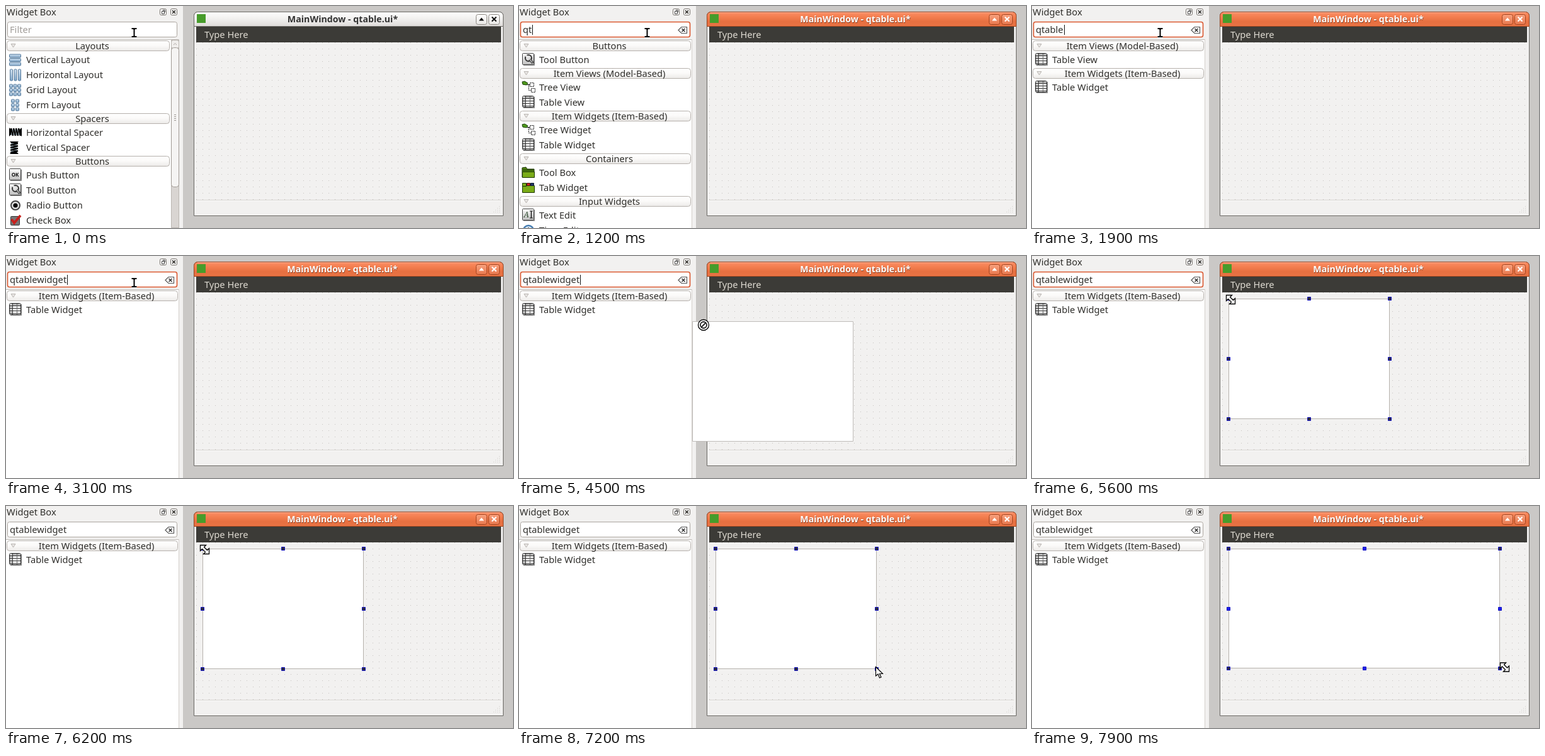
Animation of 805x354 px, one loop 8000 ms. Source, as an HTML page with a canvas:

```html
<!DOCTYPE html>
<html lang="en">
<head>
<meta charset="utf-8">
<title>Dragging a table widget into a form</title>
<style>
html, body { margin: 0; width: 100%; height: 100%; overflow: hidden; background: #cac8c6; }
canvas { display: block; }
</style>
</head>
<body>
<canvas id="stage" width="805" height="354"></canvas>
<script>
const c = document.getElementById('stage').getContext('2d');
const LOOP = 8000;
const FONT = '14.67px "Noto Sans", sans-serif';
const BOLD = 'bold 14.2px "Noto Sans", sans-serif';
const INK = '#2f2e2b', PANEL = '#f2f1f0', EDGE = '#b6b1ac';

// Drawing helpers
const mix = (a, b, k) => a + (b - a) * k;
const clamp = k => Math.max(0, Math.min(1, k));
const span = (t, a, b) => clamp((t - a) / (b - a));
const lerp = (p, q, k) => [mix(p[0], q[0], k), mix(p[1], q[1], k)];

function rect(x, y, w, h, fill) {
  c.fillStyle = fill;
  c.fillRect(x, y, w, h);
}
function box(x, y, w, h, fill, stroke, r = 0, lw = 1) {
  c.beginPath();
  c.roundRect(x + .5, y + .5, w - 1, h - 1, r);
  paint(fill, stroke, lw);
}
function paint(fill, stroke, lw = 1) {
  if (fill) { c.fillStyle = fill; c.fill(); }
  if (stroke) { c.strokeStyle = stroke; c.lineWidth = lw; c.stroke(); }
}
function poly(pts, fill, stroke, lw = 1, open) {
  c.beginPath();
  for (let i = 0; i < pts.length; i += 2) c.lineTo(pts[i], pts[i + 1]);
  if (!open) c.closePath();
  paint(fill, stroke, lw);
}
const line = (pts, stroke, lw) => poly(pts, null, stroke, lw, true);
function disc(x, y, r, fill, stroke, lw) {
  c.beginPath();
  c.arc(x, y, r, 0, 7);
  paint(fill, stroke, lw);
}
function text(s, x, y, fill = INK, font = FONT, align = 'left') {
  c.font = font;
  c.textAlign = align;
  c.fillStyle = fill;
  c.fillText(s, x, y);
}
function shade(y, h, ...stops) {
  const g = c.createLinearGradient(0, y, 0, y + h);
  stops.forEach((s, i) => g.addColorStop(i / (stops.length - 1), s));
  return g;
}
function at(x, y, draw) {
  c.save();
  c.translate(x, y);
  draw();
  c.restore();
}

// Widget icons, each in a 20 x 20 box
const tile = (x, y, w, h) => box(x, y, w, h, shade(y, h, '#d4e4f2', '#7fa6c9'), '#54799b', 1);
function tiles(x, cols, rows, w, h, dx, dy) {
  for (let i = 0; i < cols * rows; i++) tile(x + i % cols * dx, 1.5 + Math.floor(i / cols) * dy, w, h);
}
function button() {
  rect(2, 2, 18, 18, '#555555aa');
  box(0, 0, 19, 19, shade(0, 19, '#fff', '#bcbcbc'), '#444', 1);
}
function spring() {
  rect(2, 6, 16, 9, '#9fb4c2');
  for (let x = 3; x < 17; x += 4) {
    line([x, 4, x + 3, 16], '#000', 2.6);
    line([x + 3, 16, x + 4, 4], '#333', 1.2);
  }
  poly([0, 3, 3, 6, 3, 14, 0, 17], '#000');
  poly([20, 3, 17, 6, 17, 14, 20, 17], '#000');
}
function tree() {
  poly([0, 2, 4, 1, 9, 4, 7, 7, 1, 6], '#4f9a1c', '#173d08');
  c.setLineDash([2, 1]);
  line([8, 6.5, 13, 6.5], '#111');
  line([10.5, 6, 10.5, 15.5, 15, 15.5], '#111');
  box(12, 3, 7, 7, '#fff', '#111');
  box(14, 12, 7, 7, '#fff', '#111');
  c.setLineDash([]);
}
function table() {
  rect(2, 2, 18, 18, '#555555aa');
  box(0, 0, 19, 19, '#fafafa', '#222', 2);
  rect(1, 1, 17, 4, '#b4b4b4');
  rect(1, 1, 4, 17, '#c8c8c8');
  for (let y = 4.5; y < 17; y += 4) line([1, y, 18, y], '#333');
  line([5.5, 1, 5.5, 18], '#333');
  line([12.5, 1, 12.5, 18], '#666');
}
const icons = {
  'Vertical Layout': () => tiles(0, 1, 3, 19, 6, 0, 6.5),
  'Horizontal Layout': () => tiles(1, 3, 1, 5, 19, 6.5, 0),
  'Grid Layout': () => tiles(0, 3, 3, 6, 6, 6.5, 6.5),
  'Form Layout': () => tiles(3, 2, 3, 6, 6, 7, 6.5),
  'Horizontal Spacer': spring,
  'Vertical Spacer': () => at(18, 1, () => { c.rotate(Math.PI / 2); spring(); }),
  'Push Button': () => { button(); text('OK', 9.5, 12.5, '#111', 'bold 8px "Noto Sans", sans-serif', 'center'); },
  'Tool Button': () => {
    button();
    disc(10, 8, 5, '#ddd', '#333', 2);
    line([10, 8, 5, 3], '#e8e8e8', 3);
    line([12, 10, 17, 16], '#444', 4);
    line([12, 10, 16, 15], '#bbb', 1.5);
  },
  'Radio Button': () => { disc(10, 11, 7, '#e4e4e4', '#444', 2); disc(10, 11, 3.6, '#000'); },
  'Check Box': () => {
    box(2, 4, 15, 15, '#777', '#333', 1);
    line([4, 9, 8, 15, 18, 3], '#c8201c', 3.8);
  },
  'Tree View': tree, 'Tree Widget': tree,
  'Table View': table, 'Table Widget': table,
  'Tool Box': () => {
    poly([0, 3, 6, 2, 8, 5, 19, 5, 19, 18, 0, 18], '#4c7d10', '#1c3604');
    line([1, 6.5, 19, 6.5], '#1c3604');
    box(0, 9, 20, 10, '#7aac18', '#1c3604');
  },
  'Tab Widget': () => {
    box(0, 7, 20, 12, '#7aac18', '#1c3604');
    box(0, 3, 7, 6, '#7aac18', '#1c3604');
    box(7, 3, 6, 5, '#c22', '#411');
    box(13, 3, 6, 5, '#236', '#123');
  },
  'Text Edit': () => {
    button();
    text('A', 2.5, 14, '#2d4a2d', 'italic 12px "Noto Serif", serif');
    line([14.5, 4, 14.5, 15], '#111', 1.4);
    line([12, 4, 17, 4], '#111');
    line([12, 15, 17, 15], '#111');
  },
  'Time Edit': () => { disc(10, 11, 8, '#dcebf8', '#477db0', 2.5); line([10, 6, 10, 11, 14, 11], '#333', 1.4); }
};

// Group name followed by its items
const allGroups = [
  ['Layouts', 'Vertical Layout', 'Horizontal Layout', 'Grid Layout', 'Form Layout'],
  ['Spacers', 'Horizontal Spacer', 'Vertical Spacer'],
  ['Buttons', 'Push Button', 'Tool Button', 'Radio Button', 'Check Box']
];
const matchGroups = [
  ['Buttons', 'Tool Button'],
  ['Item Views (Model-Based)', 'Tree View', 'Table View'],
  ['Item Widgets (Item-Based)', 'Tree Widget', 'Table Widget'],
  ['Containers', 'Tool Box', 'Tab Widget'],
  ['Input Widgets', 'Text Edit', 'Time Edit']
];
function filtered(query) {
  if (query.length < 2) return allGroups;
  return matchGroups
    .map(g => g.filter((name, i) => !i || ('q' + name.replace(' ', '').toLowerCase()).startsWith(query)))
    .filter(g => g.length > 1);
}

// Time at which the query reaches each length
const keys = [[1000, 1], [1100, 2], [1400, 3], [1500, 4], [1800, 5], [1900, 6], [2400, 7], [2800, 11], [3100, 12]];
function typing(t) {
  let last = 200, n = 0;
  for (const [time, count] of keys) if (t >= time) [last, n] = [time, count];
  return { query: 'qtablewidget'.slice(0, n), caret: t >= 200 && t < 6100 && (t - last) % 1000 < 500 };
}

function dock(t) {
  const { query, caret } = typing(t);
  const focus = t >= 200 && t < 6100;
  rect(0, 0, 281, 354, PANEL);
  text('Widget Box', 1, 15);
  box(244, 4, 11, 11, '#f8f7f6', '#77736e', 2);
  box(249, 6, 4, 4, null, '#444');
  box(247, 8, 5, 5, '#fff', '#444');
  box(261, 4, 11, 11, '#f8f7f6', '#77736e', 2);
  line([264, 7, 269, 12], INK, 1.6);
  line([269, 7, 264, 12], INK, 1.6);

  box(2, 25, 270, 25, '#fff', focus ? '#d9572f' : '#aaa49e', 3, focus ? 1.6 : 1);
  if (t < 200) text('Filter', 6, 43, '#a09c98');
  text(query, 6, 43);
  if (caret) rect(query ? Math.round(7 + c.measureText(query).width) : 6, 30, 1, 16, '#111');
  if (query) {
    poly([253, 38.5, 258, 33.5, 266.5, 33.5, 266.5, 43.5, 258, 43.5], '#fff', '#555', 1.2);
    line([258.5, 36, 263.5, 41], '#333', 1.6);
    line([263.5, 36, 258.5, 41], '#333', 1.6);
  }

  rect(0, 53, 275, 301, '#fff');
  rect(0, 53, 275, 1, '#bdb9b5');
  rect(274, 53, 1, 301, '#d4d0cc');
  const scroll = t < 1200;
  const w = scroll ? 260 : 273;
  let y = 54;
  for (const [head, ...items] of filtered(query)) {
    box(1, y + 1, w - 1, 17, shade(y, 18, '#fff', '#fbfaf9', '#ebe9e7'), EDGE, 4);
    poly([8, y + 6.5, 15, y + 6.5, 11.5, y + 12], '#e9e7e5', '#b9b5b1');
    text(head, w / 2 + 7, y + 15, INK, FONT, 'center');
    y += 20;
    for (const item of items) {
      at(5, y + 1, icons[item]);
      text(item, 32, y + 17);
      y += 24;
    }
  }
  if (scroll) scrollbar();
}

function scrollbar() {
  box(262, 54, 13, 300, '#d9d5d2', '#bbb6b1');
  box(262, 54, 13, 14, '#f0eeec', '#bbb6b1', 3);
  line([266, 62, 268.5, 59.5, 271, 62], '#aaa6a2');
  box(262, 66, 13, 223, '#f5f4f3', '#a09a94', 4);
  for (let y = 173; y < 183; y += 3) rect(267, y, 3, 1, '#99948f');
}

function titleButton(x, active) {
  const ink = active ? '#fff' : '#111';
  box(x, 13, 18, 17, active ? shade(13, 17, '#f9a27f', '#e7774c') : shade(13, 17, '#fff', '#e8e6e4'),
    active ? '#a4441f' : '#8b8781', 3);
  if (x < 760) poly([x + 5, 23.5, x + 9, 18.5, x + 13, 23.5], ink);
  else {
    line([x + 5.5, 17.5, x + 12.5, 24.5], ink, 2);
    line([x + 12.5, 17.5, x + 5.5, 24.5], ink, 2);
  }
}

function mainWindow(t) {
  const active = t >= 200;
  box(298, 9, 492, 326, PANEL, '#6a6864', [6, 6, 0, 0]);
  box(298, 9, 492, 24, active ? shade(9, 24, '#fb9068', '#f47f50', '#e66f40', '#ea7445') : shade(9, 24, '#fff', '#f0efee', '#dddad8'),
    active ? '#96431f' : '#6a6864', [6, 6, 0, 0]);
  rect(304, 10, 480, 1, active ? '#fcb499' : '#fff');
  rect(303, 13, 14, 14, '#479c2b');
  const title = 'MainWindow - qtable.ui*';
  if (active) text(title, 534.5, 27, '#7d351a', BOLD, 'center');
  text(title, active ? 534 : 534.5, 26, active ? '#fff' : '#333', BOLD, 'center');
  titleButton(746, active);
  titleButton(766, active);
  rect(302, 33, 484, 25, '#3c3b37');
  text('Type Here', 315, 51, '#dfdbd2');

  if (t >= 4700 && t < 5100) rect(302, 58, 484, 252, '#cbc7c4');
  else for (let y = 58; y < 309; y += 10)
    for (let x = 302; x < 786; x += 10) rect(x, y, 1, 1, '#c4c1be');
  rect(302, 309, 484, 1, '#d5d2cf');
  rect(302, 310, 484, 1, '#fbfbfa');
  for (let i = 0; i < 4; i++)
    for (let j = 0; j <= i; j++) rect(783 - j * 3, 319 + i * 3, 1, 1, '#d0cdca');
}

function placed(t) {
  const k = span(t, 7400, 7900);
  const x = 312, y = 68, w = 256 + 175 * k, h = 192 - k;
  box(x, y, w, h, '#fff', EDGE);
  if (t < 5200) return;
  for (const i of [0, .5, 1]) for (const j of [0, .5, 1]) {
    const mid = i === .5 || j === .5;
    if (i === .5 && j === .5) continue;
    box(Math.round(x + w * i) - 3, Math.round(y + h * j) - 3, 6, 6, t >= 7500 && mid ? '#2020e8' : '#2b2b3c', '#1515c4');
  }
}

// Position of the dragged preview
function dragPoint(t) {
  if (t < 4500) return lerp([35, 80], [275, 104], span(t, 4200, 4500));
  if (t < 4900) return lerp([275, 104], [322, 83], span(t, 4500, 4900));
  return lerp([322, 83], [312, 68], span(t, 4900, 5100));
}

// Pointers
const pointers = {
  beam() {
    for (const [ink, lw] of [['#fff', 4], ['#000', 2]]) {
      line([-4, -6, -1, -6, 0, -5, 1, -6, 4, -6], ink, lw);
      line([0, -5, 0, 6], ink, lw);
      line([-4, 7, -1, 7, 0, 6, 1, 7, 4, 7], ink, lw);
    }
  },
  arrow() {
    poly([.5, .5, .5, 15, 4, 12, 6.5, 18, 9, 17, 6.5, 11.5, 11.5, 11.5], '#fff', '#000', 1.2);
  },
  size() {
    poly([-7, -7, 2, -7, -1, -4, 4, 1, 7, -2, 7, 7, -2, 7, 1, 4, -4, -1, -7, 2], '#fff', '#000', 1.3);
  },
  forbid() {
    disc(0, 0, 8.5, '#fff', '#000', 1.3);
    disc(0, 0, 5, null, '#222', 1.8);
    line([-3.5, 3.5, 3.5, -3.5], '#222', 1.8);
  },
  hand() {
    c.beginPath();
    c.roundRect(-7, -6, 14, 12, 5);
    paint('#fff', '#000', 1.3);
    line([-8.5, 1, -5, 3], '#000', 2);
    for (const x of [-3, 0, 3]) line([x, -6, x, -4], '#000');
    line([1, 2, 12, 2], '#000', 4.5);
    line([6.5, -3.5, 6.5, 7.5], '#000', 4.5);
    line([2.2, 2, 10.8, 2], '#fff', 2);
    line([6.5, -2.3, 6.5, 6.3], '#fff', 2);
  }
};
function bezier(k, a, b, d, e) {
  const m = 1 - k;
  return m * m * m * a + 3 * m * m * k * b + 3 * m * k * k * d + k * k * k * e;
}
function pointer(t) {
  if (t < 3400) return ['beam', 203.5, 42];
  if (t < 4300) {
    const k = span(t, 3300, 4200);
    return ['arrow', bezier(k, 203, 150, -100, 42), bezier(k, 42, 180, 160, 85)];
  }
  if (t < 5100) {
    const [x, y] = dragPoint(t);
    return t < 4700 ? ['forbid', x + 18, y + 6] : ['hand', x + 5, y + 8];
  }
  if (t < 6300) return ['size', 315.5, 69.5];
  if (t < 7300) {
    const k = span(t, 6200, 6900);
    const end = t < 7000 ? [564, 256] : t < 7200 ? [562, 254] : [566, 256];
    return ['arrow', ...lerp([315, 69], end, k * k * (3 - 2 * k))];
  }
  return ['size', ...lerp([569.5, 258.5], [750.5, 257], span(t, 7400, 7900))];
}

function draw(now) {
  const t = Math.floor(now % LOOP / 100) * 100;
  rect(0, 0, 805, 354, '#cac8c6');
  dock(t);
  mainWindow(t);
  if (t >= 5100) placed(t);
  else if (t >= 4300) {
    const [x, y] = dragPoint(t).map(Math.round);
    const inset = t < 4700 ? 0 : 2;
    box(x, y, 256 - inset, 192 - inset, '#fff', '#bfbcb9');
  }
  const [kind, x, y] = pointer(t);
  at(x, y, pointers[kind]);
}

const start = performance.now();
function tick() {
  draw(performance.now() - start);
  requestAnimationFrame(tick);
}
tick();
</script>
</body>
</html>
```
